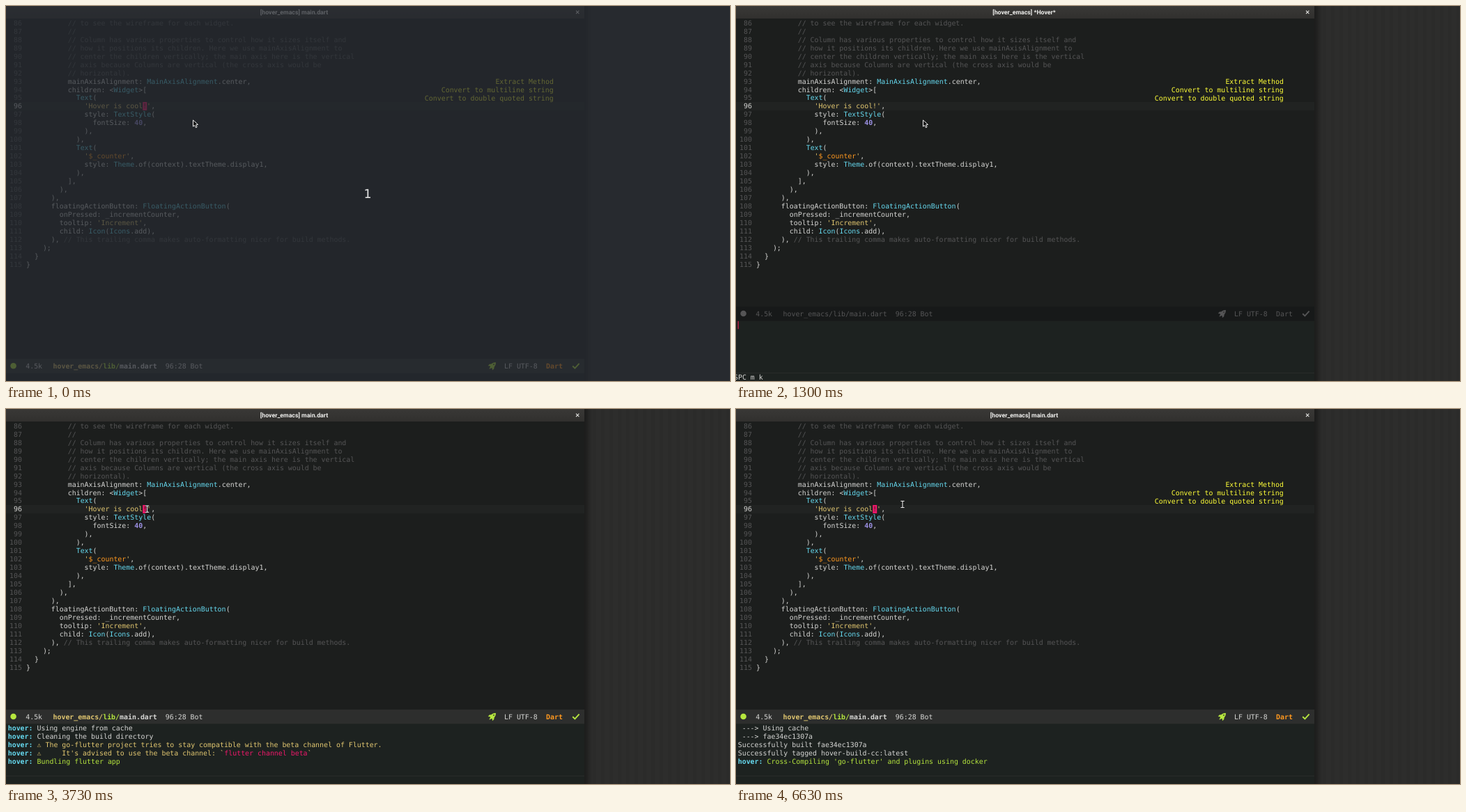
An HTML page with a canvas for the animation above (8 s loop, 1039x539 px).

```html
<!DOCTYPE html>
<html lang="en">
<head>
<meta charset="utf-8">
<title>Editor session</title>
<style>
  html, body { margin: 0; width: 100%; height: 100%; overflow: hidden; background: #2d2d2c; }
  canvas { display: block; }
</style>
</head>
<body>
<canvas id="stage" width="1039" height="539"></canvas>
<script>
const ctx = document.getElementById('stage').getContext('2d');
const LOOP = 8000, W = 1039, H = 539, EDITOR_W = 830;
const CELL = 5.973, ROW = 11.965, FONT_SIZE = 9.92;
const MONO = '"DejaVu Sans Mono", monospace';
const C = {
  bg: '#1c1e1d', line: '#212322', popup: '#1d2220', bar: '#2d2e2d', barOff: '#171919',
  fg: '#d6d6d4', dim: '#555556', blue: '#66d9ef', yellow: '#e2c770', green: '#b6e63e',
  orange: '#fd971f', violet: '#9c91e4', pink: '#f0186a', hint: '#ffff38'
};

const FIRST_LINE = 86, CURRENT_LINE = 96, CURSOR_COL = 28;
const CODE = `          // to see the wireframe for each widget.
          //
          // Column has various properties to control how it sizes itself and
          // how it positions its children. Here we use mainAxisAlignment to
          // center the children vertically; the main axis here is the vertical
          // axis because Columns are vertical (the cross axis would be
          // horizontal).
          mainAxisAlignment: MainAxisAlignment.center,
          children: <Widget>[
            Text(
              'Hover is cool!',
              style: TextStyle(
                fontSize: 40,
              ),
            ),
            Text(
              '$_counter',
              style: Theme.of(context).textTheme.display1,
            ),
          ],
        ),
      ),
      floatingActionButton: FloatingActionButton(
        onPressed: _incrementCounter,
        tooltip: 'Increment',
        child: Icon(Icons.add),
      ), // This trailing comma makes auto-formatting nicer for build methods.
    );
  }
}`.split('\n');

const HINTS = ['Extract Method', 'Convert to multiline string', 'Convert to double quoted string'];

// Each log line is a list of [color, text, bold] runs.
const hover = (...runs) => [[C.blue, 'hover: ', true], ...runs];
const plain = text => [[C.fg, text]];
const LOG = [
  hover([C.fg, 'Using engine from cache']),
  hover([C.fg, 'Cleaning the build directory']),
  hover([C.yellow, '⚠'], [C.yellow, ' The go-flutter project tries to stay compatible with the beta channel of Flutter.']),
  hover([C.yellow, '⚠'], [C.yellow, "     It's advised to use the beta channel: `"], [C.pink, 'flutter channel beta'], [C.yellow, '`']),
  hover([C.green, 'Bundling flutter app']),
  plain('Sending build context to Docker daemon  2.048kB'),
  plain(' ---> Using cache'),
  plain(' ---> fae34ec1307a'),
  plain('Successfully built fae34ec1307a'),
  plain('Successfully tagged hover-build-cc:latest'),
  hover([C.green, "Cross-Compiling 'go-flutter' and plugins using docker"])
];
const LOG_ROWS = 5;

const LOG_STEPS = [[0, 0], [2070, 1], [2100, 2], [2830, 4], [2870, 5], [6470, 6], [6530, 10], [6630, 11]];
const KEY_STEPS = [[0, ''], [730, 'SPC-'], [1000, 'SPC m-'], [1230, 'SPC m k'], [3400, '']];
const valueAt = (steps, t) => steps.filter(s => t >= s[0]).pop()[1];

function rect(color, x, y, w, h) {
  ctx.fillStyle = color;
  ctx.fillRect(x, y, w, h);
}

function mono(text, x, midY, color, bold) {
  ctx.font = `${bold ? 'bold ' : ''}${FONT_SIZE}px ${MONO}`;
  ctx.fillStyle = color;
  ctx.fillText(text, x, midY + 3.6);
}

function runs(list, x, midY) {
  let col = 0;
  for (const [color, text, bold] of list) {
    mono(text, x + col * CELL, midY, color, bold);
    col += text.length;
  }
}

function path(points, close) {
  ctx.beginPath();
  points.forEach(([x, y]) => ctx.lineTo(x, y));
  if (close) ctx.closePath();
}

function highlight(source) {
  const token = /(\/\/.*)|(\$\w+)|('Hover[^']*'|'Increment'|')|(\b[A-Z]\w*)|(\b\d+\b)|\s+|\w+|./g;
  return [...source.matchAll(token)].map(m => {
    const color = m[1] ? C.dim : m[2] ? C.orange : m[3] ? C.yellow : m[4] ? C.blue : m[5] ? C.violet : C.fg;
    return [color, m[0], Boolean(m[5])];
  });
}
const HIGHLIGHTED = CODE.map(highlight);

function drawDesktop() {
  rect('#2d2d2c', 0, 0, W, H);
  for (let x = EDITOR_W; x < W; x += 12) rect('#2b2b2a', x, 0, 5, H);
  const shadow = ctx.createLinearGradient(EDITOR_W, 0, EDITOR_W + 12, 0);
  shadow.addColorStop(0, 'rgba(0,0,0,.35)');
  shadow.addColorStop(1, 'rgba(0,0,0,0)');
  rect(shadow, EDITOR_W, 0, 12, H);
}

function drawTitle(title) {
  const shade = ctx.createLinearGradient(0, 0, 0, 18);
  shade.addColorStop(0, '#393836');
  shade.addColorStop(1, '#31302e');
  rect(shade, 0, 0, EDITOR_W, 18);
  ctx.font = 'bold 8.77px Roboto, sans-serif';
  ctx.fillStyle = '#f0f0ee';
  ctx.textAlign = 'center';
  ctx.fillText(title, 413.5, 11.6);
  ctx.textAlign = 'left';
  ctx.strokeStyle = '#e4e4e2';
  ctx.lineWidth = 1.1;
  path([[818, 6.7], [822.4, 11.1]]);
  ctx.stroke();
  path([[822.4, 6.7], [818, 11.1]]);
  ctx.stroke();
}

function drawCode(block, selected) {
  const cursorX = 29 + CURSOR_COL * CELL;
  rect(C.line, 0, 138, EDITOR_W, 12);
  if (selected) rect('#4e4e4e', cursorX, 138, 6, 12);
  HIGHLIGHTED.forEach((line, i) => {
    const number = FIRST_LINE + i, y = 24.2 + i * ROW;
    const label = String(number);
    mono(label, 23 - label.length * CELL, y, number === CURRENT_LINE ? C.fg : C.dim);
    runs(line, 29, y);
  });
  if (block) {
    rect(C.pink, cursorX, 138, 6, 12);
    mono('!', cursorX, 24.2 + 10 * ROW, C.bg);
  }
}

function drawHints() {
  HINTS.forEach((text, i) => mono(text, 786 - text.length * CELL, 108 + i * ROW, C.hint));
}

function drawRocket(x, y, color) {
  ctx.save();
  ctx.translate(x, y);
  ctx.rotate(Math.PI / 4);
  ctx.fillStyle = color;
  ctx.beginPath();
  ctx.moveTo(0, -7);
  ctx.quadraticCurveTo(4.2, -3, 2.4, 2.5);
  ctx.lineTo(-2.4, 2.5);
  ctx.quadraticCurveTo(-4.2, -3, 0, -7);
  ctx.fill();
  path([[-2.2, -1.5], [-4.6, 1.2], [-4.4, 4.4], [-1.6, 2.2], [0, 6.6], [1.6, 2.2], [4.4, 4.4], [4.6, 1.2], [2.2, -1.5]], true);
  ctx.fill();
  rect(C.bar, -0.8, -3.6, 1.6, 1.6);
  ctx.restore();
}

function drawStatus(midY, active, selected) {
  const tint = color => active ? color : C.dim;
  rect(active ? C.bar : C.barOff, 0, midY - 10, EDITOR_W, 20.5);
  ctx.fillStyle = tint(selected ? C.yellow : C.green);
  ctx.beginPath();
  ctx.arc(10.6, midY, 4.3, 0, Math.PI * 2);
  ctx.fill();
  mono('4.5k', 28.2, midY, tint(C.fg));
  runs([[tint(C.yellow), 'hover_emacs/', active], [tint(C.green), 'lib/', active], [tint(C.fg), 'main.dart', active]], 67.5, midY);
  mono('96:28 Bot', 228.8, midY, tint(C.fg));
  if (selected) mono('1C', 289, midY, C.yellow, true);
  drawRocket(698, midY, tint(C.green));
  mono('LF UTF-8', 715, midY, tint(C.fg));
  mono('Dart', 775, midY, tint(C.orange), active);
  ctx.strokeStyle = tint(C.green);
  ctx.lineWidth = 1.9;
  path([[813.2, midY + .3], [816.4, midY + 3.4], [822.6, midY - 3.4]]);
  ctx.stroke();
}

function drawPopup(count, focused) {
  rect(C.popup, 0, 452.5, EDITOR_W, 75);
  const start = Math.max(0, count - LOG_ROWS);
  LOG.slice(start, count).forEach((line, i) => runs(line, 2.7, 458.4 + i * ROW));
  if (focused) rect('#d0204f', 2.6, 452.7 + (count - start) * ROW, 1.2, 11.6);
}

function drawEcho(keys) {
  rect(C.popup, 0, 528, EDITOR_W, 11);
  rect('#292c2a', 0, 527, EDITOR_W, 1);
  mono(keys, -3, 533.5, C.fg);
}

function drawArrow(x, y) {
  path([[0, 0], [0, 9.2], [2.2, 7.4], [3.9, 10.8], [5.6, 10], [4.1, 6.8], [7, 6.5]].map(([a, b]) => [x + a, y + b]), true);
  ctx.fillStyle = '#111';
  ctx.fill();
  ctx.strokeStyle = '#f2f2f2';
  ctx.lineWidth = 1;
  ctx.stroke();
}

function drawBeam(x, y) {
  for (const [color, width] of [['#101010', 2.8], ['#f2f2f2', 1.1]]) {
    ctx.strokeStyle = color;
    ctx.lineWidth = width;
    for (const points of [[[-2.6, -4.6], [2.6, -4.6]], [[0, -4.6], [0, 4.6]], [[-2.6, 4.6], [2.6, 4.6]]]) {
      path(points.map(([a, b]) => [x + a, y + b]));
      ctx.stroke();
    }
  }
}

// Pointer moves arrive in discrete 70 ms updates.
function glide(t, start, steps) {
  const p = Math.min(1, Math.max(0, (Math.floor((t - start) / 70) + 1) / steps));
  return p * p * (3 - 2 * p);
}

function drawPointer(t) {
  if (t < 2630) return drawArrow(268.5, 164);
  const toWord = glide(t, 2630, 11), away = glide(t, 3730, 8);
  drawBeam(271 - 70 * toWord + 38 * away, 169 - 25 * toWord - 7 * away);
}

function drawCountdown() {
  rect('rgba(38,42,49,.72)', 0, 0, W, H);
  ctx.font = '17.5px "DejaVu Sans", sans-serif';
  ctx.fillStyle = '#e8e8e8';
  ctx.textAlign = 'center';
  ctx.fillText('1', 519, 275.7);
  ctx.textAlign = 'left';
}

function draw(t) {
  const popup = t >= 1300, popupFocused = popup && t < 3400;
  const selected = t >= 3400 && t < 3470;
  drawDesktop();
  rect(C.bg, 0, 0, EDITOR_W, H);
  drawCode(!popupFocused && !selected, selected);
  if (t < 2300 || t >= 4370) drawHints();
  drawTitle(popupFocused ? '[hover_emacs] *Hover*' : '[hover_emacs] main.dart');
  if (popup) drawPopup(valueAt(LOG_STEPS, t), popupFocused);
  drawEcho(valueAt(KEY_STEPS, t));
  drawStatus(popup ? 442 : 517.2, !popupFocused, selected);
  if (t < 30) drawCountdown();
  drawPointer(t);
}

ctx.textRendering = 'geometricPrecision';
const begin = performance.now();
function frame() {
  draw((performance.now() - begin) % LOOP);
  requestAnimationFrame(frame);
}
frame();
</script>
</body>
</html>
```
